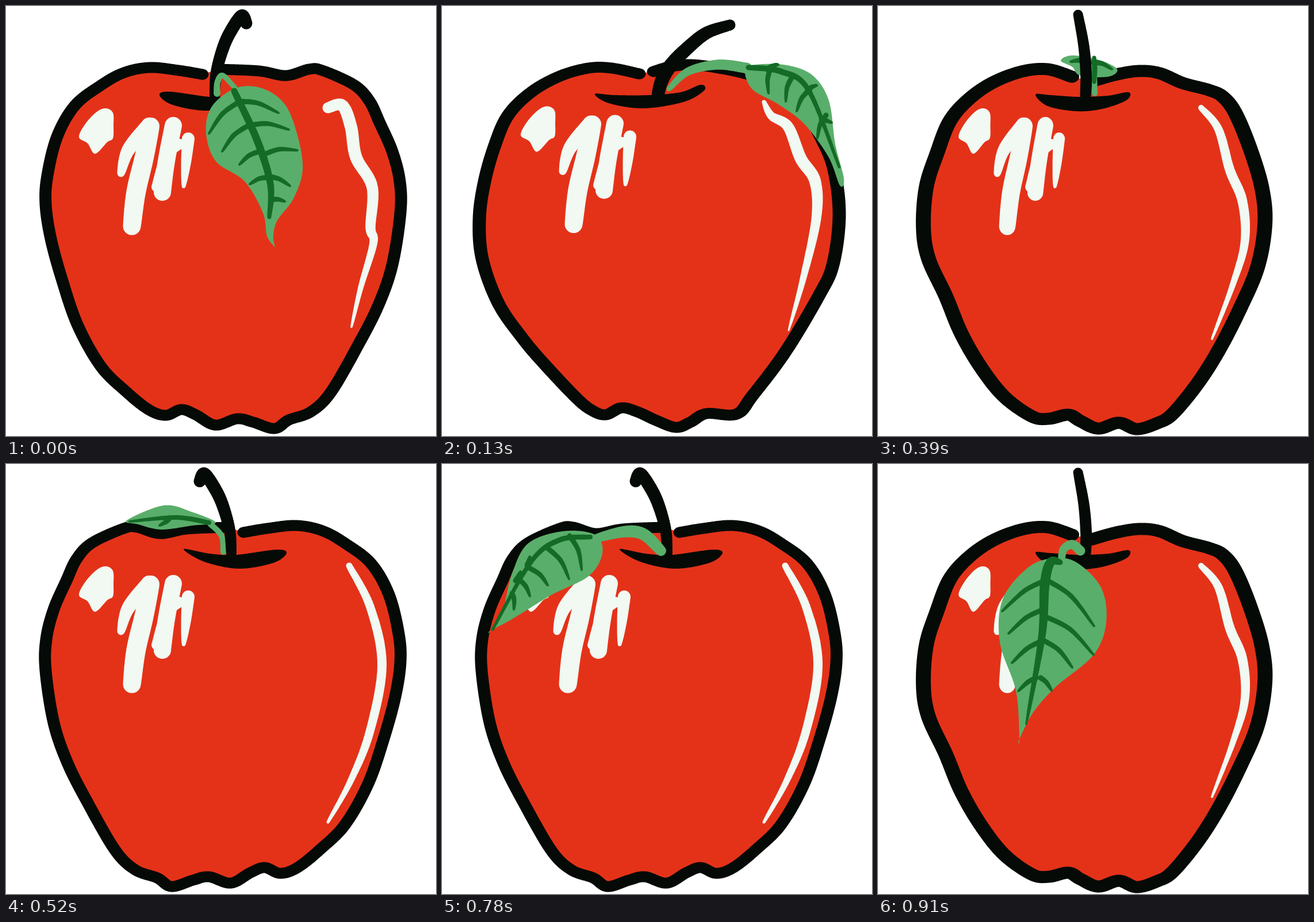
An HTML page with a canvas for the animation above (1040 ms loop, 748 by 748 pixels).

```html
<!DOCTYPE html>
<html lang="en">
<head>
<meta charset="utf-8">
<title>Turning apple</title>
<style>
html, body { margin: 0; width: 100%; height: 100%; overflow: hidden; background: #fff; }
canvas { display: block; }
</style>
</head>
<body>
<canvas id="stage" width="748" height="748"></canvas>
<script>
const ctx = document.getElementById('stage').getContext('2d');
const RED = '#e43219', INK = '#050a06', SHINE = '#f1f9f2', GREEN = '#5aae6b', VEIN = '#146b26';
const STEP = 130, DETAIL = 36;

// Samples a smooth curve through "x y x y ..."; a repeated point makes a corner.
function curve(text, closed) {
  const n = text.trim().split(/\s+/).map(Number), count = n.length / 2, out = [];
  const at = (i, axis) => {
    const k = closed ? (i + count) % count : Math.max(0, Math.min(count - 1, i));
    return n[2 * k + axis];
  };
  const mix = (i, axis, t) => {
    const [a, b, c, d] = [-1, 0, 1, 2].map(k => at(i + k, axis));
    return b + t / 2 * (c - a + t * (2 * a - 5 * b + 4 * c - d + t * (3 * b - a - 3 * c + d)));
  };
  for (let i = 0; i < count - (closed ? 0 : 1); i++)
    for (let s = 0; s < DETAIL; s++) out.push([mix(i, 0, s / DETAIL), mix(i, 1, s / DETAIL)]);
  if (!closed) out.push([at(count, 0), at(count, 1)]);
  return out;
}

function trace(points) {
  ctx.beginPath();
  points.forEach(p => ctx.lineTo(...p));
}

function blob(text, color) {
  trace(curve(text, true));
  ctx.fillStyle = color;
  ctx.fill();
}

// Brush stroke whose width eases from start over middle to end.
function brush(text, color, [start, mid = start, end = mid]) {
  const points = curve(text);
  ctx.beginPath();
  points.forEach(([x, y], i) => {
    const t = i / (points.length - 1);
    const r = (start * (1 - t) * (1 - 2 * t) + 4 * mid * t * (1 - t) + end * t * (2 * t - 1)) / 2;
    ctx.moveTo(x + r, y);
    ctx.arc(x, y, Math.max(r, .5), 0, 7);
  });
  ctx.fillStyle = color;
  ctx.fill();
}

const bodies = {
  curled: {
    axis: 755, nib: [21, 19],
    outline: `342 119 300 112 250 107 205 116 165 138 120 173 89 227 72 295 69 345 78 405 98 478 125 556 165 627 208 670
      248 702 278 712 305 702 330 711 364 729 402 718 430 724 467 735 492 720 530 706 565 672 613 589 648 520 672 450
      686 360 685 305 672 253 650 203 632 165 605 137 550 112 527 110 487 121 440 113 368 110`,
    stem: '363 155 366 115 378 72 392 42 410 17 418 30', stemWidth: [18, 22, 21],
    crease: '446 148 400 156 355 158 285 149 267 155 290 172 350 182 410 170',
    patch: [1, 0, 0],
    shine: '560 177 585 173 600 210 609 263 637 315 634 385 639 413 617 490 601 558', shineWidth: [19, 20, 4],
    flippedShine: '597 177 634 250 654 350 633 465 600 550 560 623', flippedWidth: [11, 16, 5]
  },
  leaning: {
    axis: 756, nib: [23, 19],
    outline: `343 118 295 108 255 108 205 122 155 150 115 190 92 242 74 305 65 370 70 440 98 517 140 578 180 625 235 683
      262 704 285 711 312 699 340 706 373 721 407 733 432 724 460 709 512 710 540 678 597 602 655 505 680 450 691 365
      682 285 660 230 630 180 580 135 525 117 470 106 430 102 395 106 368 114`,
    stem: '376 152 383 128 398 103 425 75 460 47 501 33', stemWidth: [22, 24, 19],
    crease: '266 153 300 155 360 155 415 150 450 137 456 147 420 167 350 178 290 169',
    patch: [1, 10, -3.5],
    shine: '560 167 573 191 602 210 624 265 649 305 651 370 628 475 603 564', shineWidth: [7, 21, 3],
    flippedShine: '607 201 639 275 654 365 640 475 584 601', flippedWidth: [7, 19, 4]
  },
  upright: {
    axis: 756, nib: [26, 21],
    outline: `337 123 295 110 250 114 200 133 158 162 125 200 103 255 84 315 79 385 88 440 118 505 145 570 180 630 220 680
      268 714 297 718 331 711 352 722 383 735 419 725 450 736 485 726 512 710 555 658 592 600 628 530 660 455 673 380
      668 318 648 250 622 187 600 158 575 146 530 134 490 117 455 113 415 119 372 131`,
    stem: '361 156 362 120 358 70 348 15', stemWidth: [19, 20, 17],
    crease: '274 154 300 155 350 158 400 156 436 150 432 164 390 179 345 183 295 174',
    patch: [.92, 23.4, 0],
    shine: '562 177 592 214 612 285 634 340 638 410 617 485 581 579', shineWidth: [10, 17, 4]
  }
};

// Scribbled highlight on the upper left: strokes as [points, widths].
const scribble = [
  ['200 291 213 250 249 208', [13, 23, 28]],
  ['219 383 226 325 240 265 252 209', [31, 34, 30]],
  ['272 324 279 270 291 208', [30]],
  ['309 314 313 275 317 231', [6, 17, 22]],
  ['262 315 278 262 302 240', [18]]
];
const dab = '174 178 186 186 187 208 186 230 176 237 155 257 142 239 127 228 138 205 158 184';

const leaves = {
  frontRight: {
    stalk: '367 152 368 132 377 121 398 142', stalkWidth: [12, 10, 9],
    blade: `399 143 445 143 485 171 507 225 516 285 500 335 472 373 465 400 468 420 468 420 454 400 447 360 415 305
      365 270 348 220 358 175`,
    rib: '397 148 437 234 460 310 458 367', ribWidth: [11, 13, 7],
    veins: ['402 169 353 222', '418 210 376 253', '441 253 406 276', '458 298 424 310', '408 166 474 186',
      '422 208 492 215', '445 260 507 251', '460 297 494 313', '462 337 485 340']
  },
  right: {
    stalk: '395 144 428 114 480 102 530 108', stalkWidth: [9, 16, 19],
    blade: '527 112 545 102 600 103 645 121 673 165 684 240 699 300 692 312 672 262 630 205 585 171 540 145',
    rib: '533 107 590 114 638 147 691 280', ribWidth: [9, 10, 5],
    veins: ['570 112 568 152', '608 125 598 166', '640 145 617 183', '668 190 653 230', '566 110 585 102',
      '636 147 652 138', '660 198 678 203']
  },
  backRight: {
    behindStem: true,
    stalk: '377 153 380 125 400 104', stalkWidth: [10],
    blade: '390 102 430 84 480 72 545 98 525 105 485 114 430 107',
    rib: '402 102 460 93 540 100', ribWidth: [8, 8, 4],
    veins: ['470 94 488 107']
  },
  back: {
    behindStem: true,
    stalk: '377 152 376 115', stalkWidth: [10],
    blade: '318 95 338 86 385 94 416 110 400 123 352 121 338 106',
    rib: '376 90 377 110 376 132', ribWidth: [7, 9, 7],
    veins: ['362 98 335 97', '374 98 407 110']
  },
  left: {
    stalk: '375 143 340 118 290 99 228 109', stalkWidth: [17, 18, 16],
    blade: '228 104 170 101 115 125 85 170 77 245 58 295 61 309 85 265 130 205 195 158 230 125',
    rib: '222 103 165 109 118 155 64 296', ribWidth: [8, 11, 6],
    veins: ['198 103 189 131', '155 115 157 171', '125 145 131 183', '98 180 118 215', '112 160 93 161', '140 124 121 126']
  },
  frontLeft: {
    stalk: '381 151 350 122 315 118 266 130', stalkWidth: [18, 21, 14],
    blade: '266 123 210 117 150 138 122 190 106 252 84 290 84 290 125 268 190 228 255 195 279 155',
    rib: '258 127 205 132 155 170 88 288', ribWidth: [8, 9, 5],
    veins: ['222 125 243 184', '182 145 221 200', '150 180 184 211', '133 200 153 230', '122 225 125 253',
      '148 176 153 161', '128 203 137 187']
  },
  front: {
    stalk: '319 168 323 148 338 140 352 151', stalkWidth: [12, 15, 17],
    blade: '303 164 345 171 388 215 397 275 375 332 310 387 270 432 246 478 246 478 240 395 212 310 217 235 260 181',
    rib: '317 171 300 171 290 210 285 300 258 452', ribWidth: [9, 17, 4],
    veins: ['290 203 216 256', '283 255 227 295', '280 310 233 346', '275 372 244 395', '290 200 376 282',
      '290 265 375 332', '290 308 338 354', '283 372 302 394']
  }
};

// One full turn: body, mirrored body, leaf, mirrored leaf.
const poses = [
  ['curled', false, 'frontRight'],
  ['leaning', false, 'right'],
  ['curled', false, 'backRight'],
  ['upright', false, 'back'],
  ['curled', true, 'backRight', true],
  ['leaning', true, 'left'],
  ['curled', true, 'frontLeft'],
  ['upright', false, 'front']
];

function mirror(on, axis) {
  ctx.setTransform(on ? -1 : 1, 0, 0, 1, on ? axis : 0, 0);
}

function drawLeaf({ stalk, stalkWidth, blade, rib, ribWidth, veins }) {
  brush(stalk, GREEN, stalkWidth);
  blob(blade, GREEN);
  brush(rib, VEIN, ribWidth);
  const spine = curve(rib), [bx, by] = spine[0], [tx, ty] = spine[spine.length - 1];
  const length = Math.hypot(bx - tx, by - ty);
  // Side veins bow towards the base of the leaf.
  veins.forEach(vein => {
    const [x1, y1, x2, y2] = vein.split(' ').map(Number);
    const bow = .1 * Math.hypot(x2 - x1, y2 - y1) / length;
    const mx = (x1 + x2) / 2 + bow * (bx - tx), my = (y1 + y2) / 2 + bow * (by - ty);
    brush(`${x1} ${y1} ${mx} ${my} ${x2} ${y2}`, VEIN, [9, 8, 4]);
  });
}

function drawOutline({ outline, nib }) {
  trace(curve(outline));
  ctx.fillStyle = RED;
  ctx.fill();
  ctx.save();
  ctx.scale(nib[0] / nib[1], 1);
  ctx.lineWidth = nib[1];
  ctx.lineCap = ctx.lineJoin = 'round';
  ctx.strokeStyle = INK;
  ctx.stroke();
  ctx.restore();
}

function drawPose([bodyName, flipped, leafName, leafFlipped]) {
  const body = bodies[bodyName], leaf = leaves[leafName];
  const placeLeaf = () => { mirror(leafFlipped, body.axis); drawLeaf(leaf); };
  mirror(false);
  ctx.fillStyle = '#fff';
  ctx.fillRect(0, 0, 748, 748);

  mirror(flipped, body.axis);
  drawOutline(body);
  if (leaf.behindStem) placeLeaf();
  mirror(flipped, body.axis);
  blob(body.crease, INK);
  brush(body.stem, INK, body.stemWidth);

  const [scale, dx, dy] = body.patch;
  ctx.setTransform(scale, 0, 0, 1, dx, dy);
  blob(dab, SHINE);
  scribble.forEach(([points, widths]) => brush(points, SHINE, widths));
  mirror(false);
  if (flipped) brush(body.flippedShine, SHINE, body.flippedWidth);
  else brush(body.shine, SHINE, body.shineWidth);
  if (!leaf.behindStem) placeLeaf();
}

let shown = -1;
function tick() {
  const index = Math.floor(performance.now() / STEP) % poses.length;
  if (index !== shown) drawPose(poses[shown = index]);
  requestAnimationFrame(tick);
}
tick();
</script>
</body>
</html>
```
